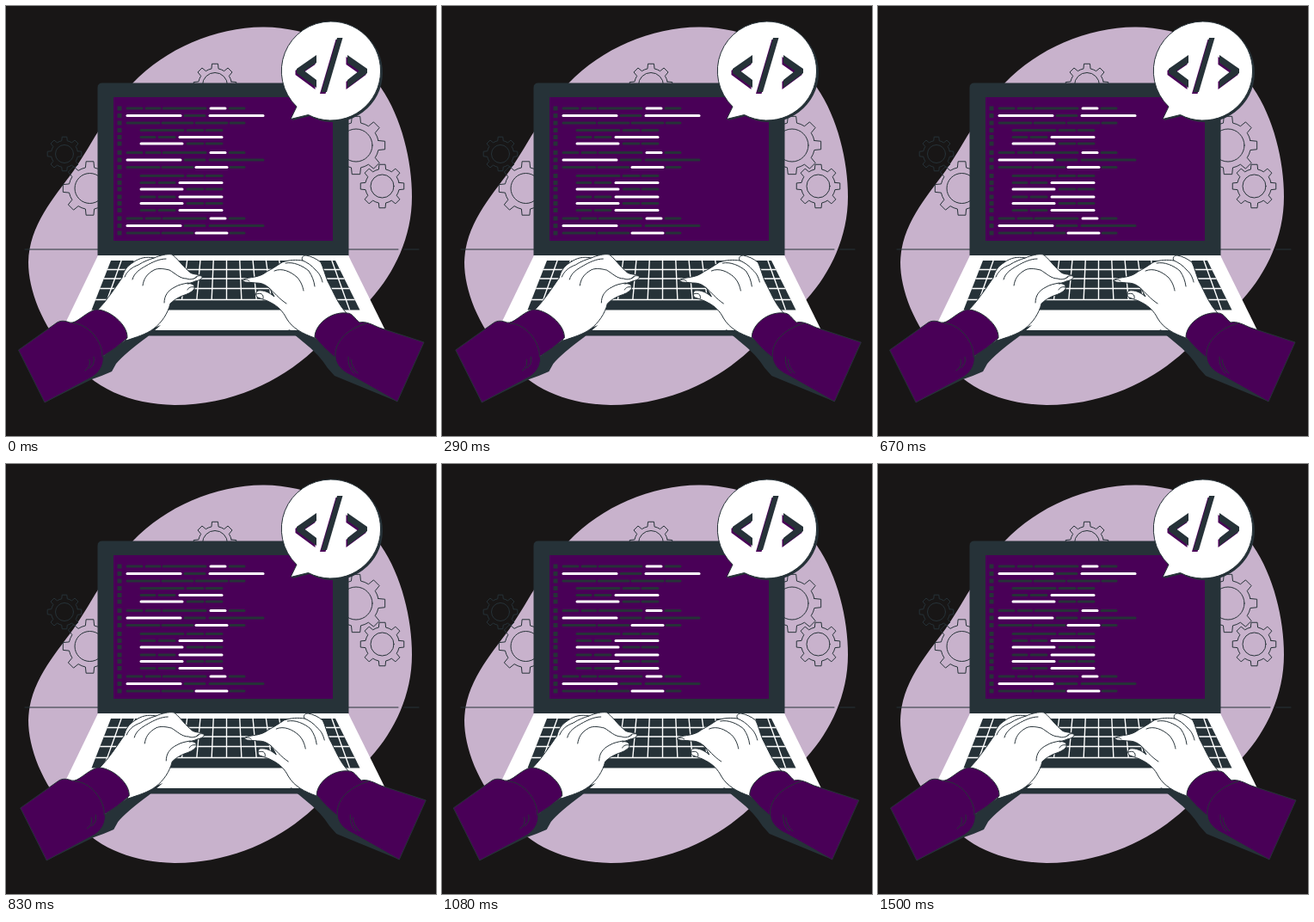
An HTML page that plays this animation: 500x500 px, repeating every 1540 ms.

```html
<!DOCTYPE html>
<html lang="en">
<head>
<meta charset="utf-8">
<title>Typing on a laptop</title>
<style>
  html, body { margin: 0; width: 100%; height: 100%; overflow: hidden; background: #181616; }
  svg { display: block; width: 100vw; height: 100vh; }
  .ink { fill: #263238; }
  .main { fill: #490057; }
  .paper { fill: #fff; }
  .line { fill: none; stroke: #263238; stroke-width: 1; stroke-linecap: round; stroke-linejoin: round; }
  .edge { stroke: #263238; stroke-width: 1; stroke-linejoin: round; }
  #code path { fill: none; stroke-width: 3; stroke-linecap: round; }
</style>
</head>
<body>
<svg viewBox="0 0 500 500">
  <defs>
    <clipPath id="keyArea"><path d="M122 296H383L411.5 353.5H99.5Z"/></clipPath>
    <g id="tag">
      <path d="M361 57V66L347 75.5L361 86V95L338 78V73Z"/>
      <path d="M385 37H391.5L373 100H366.5Z"/>
      <path d="M397 57V66L410.500 75.500L397 86V95L420 78V73Z"/>
    </g>
  </defs>

  <path fill="#c8b2cc" d="M300 24.500C352 25 405 48 436 95C460 130 472 180 472 222C472 268 452 310 424 341C405 362 380 380 357 401C318 437 262 464 196 464C145 463 100 445 72 405C42 372 26 330 26 298C27 255 55 224 79 191C102 158 120 118 148 89C185 50 245 24 300 24.500Z"/>
  <path class="line" d="M22 283H456M463 283H480"/>
  <g id="gears" class="line"></g>

  <path class="ink" d="M112 89.500H393Q398.500 89.500 398.500 95V290H106.500V95Q106.500 89.500 112 89.500Z"/>
  <path class="main" d="M125 106H380V273H125Z"/>
  <g id="code"></g>

  <path class="paper" d="M107 290H398L441 377H65Z"/>
  <path class="ink" d="M64 377H442L439 383.500H67Z"/>
  <g clip-path="url(#keyArea)">
    <path class="ink" d="M95 296H415V354H95Z"/>
    <path id="keys" fill="none" stroke="#fff" stroke-width="1.400"/>
  </g>

  <path class="ink" d="M380 20A57.500 57.500 0 1 1 353 128L333 133L340 118A57.500 57.500 0 0 1 380 20Z"/>
  <path class="paper edge" d="M377.500 18A57.500 57.500 0 1 1 351.500 126.500L331 131.500L338 117A57.500 57.500 0 0 1 377.500 18Z"/>
  <use href="#tag" class="main" x="-1.500" y="2"/>
  <use href="#tag" class="ink"/>

  <g id="arms">
    <g>
      <path class="ink" d="M45 461L100 428L112 408L141 387L180 371L164 385Q138 404 128 416L123 425Q112 430 100 434Z"/>
      <path class="paper edge" d="M106 354C117 343 126 329 135 316C137 308 140 303 148 298C155 293 163 291 172 293C179 290 187 288 193 289C199 293 204 301 212 308C216 313 222 311 228 314C229 317 225 319 220 320C216 322 213 322 211 323C216 322 220 324 219 329C216 333 211 335 205 337C198 340 194 343 191 346C188 358 181 368 172 375C163 382 151 385 140 389Z"/>
      <path class="line" d="M138 315C141 308 146 304 154 301C160 297 166 295 172 293M147 318C149 310 156 306 163 302C170 298 178 294 186 294M159 325C160 318 163 312 172 307C178 304 185 306 190 307C197 311 202 317 210 317C215 319 219 317 222 315M184 345C184 337 188 331 196 327C201 324 206 323 212 322M228 314C224 313 221 314 219 317M219 327C216 326 212 327 211 330"/>
      <path class="main edge" d="M14.500 400L58 369C63 365 69 366 74 368C82 370 91 357 104 353C119 352 142 370 141 386Q127 399 113 407C114 415 111 424 101 431L45 461Z"/>
      <path class="line" d="M78 369C95 369 113 390 112 408M92 424Q99 420 97 411M97 421Q104 417 102 408"/>
    </g>
    <g>
      <path class="ink" d="M455 460L402 426L383 405L358 385L328 376L346 391Q364 405 374 421L382 430Z"/>
      <path class="paper edge" d="M396 357C386 347 381 333 374 320C371 313 369 304 366 298C361 294 355 291 349 290C345 290 343 293 345 296C338 295 329 295 321 298C315 302 309 306 303 309C297 314 290 315 283 316C278 317 274 318 275 320C279 322 285 321 290 322C296 322 300 323 305 327C308 330 310 334 312 338C306 333 300 330 293 331C290 333 290 337 293 339C298 341 303 342 308 345C316 349 322 355 326 363C333 375 345 381 359 386Z"/>
      <path class="line" d="M345 296C350 298 356 302 360 307C365 311 367 317 368 321M325 299C334 297 345 302 352 308C356 314 358 319 359 326M312 308C321 304 331 309 338 315C343 320 345 326 346 331M275 320C278 317 281 318 283 320M291 335C296 333 300 335 299 340M305 327C312 333 317 340 326 346"/>
      <path class="main edge" d="M359 385C359 371 377 355 396 357C403 357 405 363 411 368C418 366 427 371 434 374L486 391L455 460L402 430C393 426 384 419 383 409Q370 399 359 385Z"/>
      <path class="line" d="M383 409C381 391 396 376 419 369M398 408Q397 420 405 427M401 411Q402 421 409 427"/>
    </g>
  </g>
</svg>
<script>
const NS = "http://www.w3.org/2000/svg";
const $ = id => document.getElementById(id);
function add(parent, tag, attrs) {
  const el = document.createElementNS(NS, tag);
  for (const k in attrs) el.setAttribute(k, attrs[k]);
  parent.append(el);
}

// Gears: centre, outer radius, hole radius
function gear(x, y, r, hole) {
  const at = (rad, deg) => {
    const a = deg * Math.PI / 180;
    return (x + rad * Math.cos(a)).toFixed(2) + " " + (y + rad * Math.sin(a)).toFixed(2);
  };
  const root = r * 0.78;
  let d = "";
  for (let a = 0; a < 360; a += 45) {
    d += `${a ? "L" : "M"}${at(root, a - 12)}L${at(r, a - 8)}L${at(r, a + 8)}L${at(root, a + 12)}` +
         `A${root} ${root} 0 0 1 ${at(root, a + 33)}`;
  }
  add($("gears"), "path", { d: d + "Z" });
  add($("gears"), "circle", { cx: x, cy: y, r: hole });
}
gear(243, 92, 25, 14.5);
gear(97.5, 212, 31.5, 17.5);
gear(407, 162, 34, 19);
gear(437.5, 209.5, 25.5, 13.5);
gear(68, 172, 20, 10.5);

// Code lines: [start, end, white?]
const rowTypes = {
  a: [[141, 158], [163, 179], [183, 232], [238, 255, 1], [260, 277]],
  b: [[141, 203, 1], [208, 231], [237, 299, 1]],
  B: [[141, 203, 1], [208, 231], [237, 299]],
  c: [[141, 178], [182, 217], [221, 257], [261, 277]],
  C: [[141, 178], [182, 217], [221, 257, 1], [261, 277]],
  d: [[157, 206], [211, 229], [233, 251]],
  e: [[157, 173], [178, 196], [202, 251, 1]],
  f: [[157, 205, 1], [211, 229], [233, 251]]
};
const rowY = [119, 127.5, 136, 144.5, 152.5, 160, 170.5, 179, 187.5,
              197.5, 205.5, 213, 222, 229.5, 237.5, 247, 255.5, 264];
[..."abcdefaBCdefefeaBC"].forEach((type, i) => {
  const y = rowY[i];
  add($("code"), "rect", { x: 129.5, y: y - 2.5, width: 5, height: 5, class: "ink" });
  for (const [from, to, white] of rowTypes[type])
    add($("code"), "path", { d: `M${from} ${y}H${to}`, stroke: white ? "#fff" : "#263238" });
});

// Keyboard gaps fan out towards the viewer
let gaps = "";
for (const y of [306.5, 317, 328.5, 341.5]) gaps += `M95 ${y}H415`;
for (let j = -9; j <= 9; j++) {
  const x = y => 256.5 + j * (15.3 + (y - 296) * 0.045);
  const end = j > -5 && j < 4 ? 341.5 : 354;
  gaps += `M${x(296)} 296L${x(end)} ${end}`;
}
$("keys").setAttribute("d", gaps);

// Shake: ten equal spans, linear between the stops, stepped at 24 per second
const LOOP = 1540, PERIOD = 1500, LEAD = 30;
const stops = [0, -1, 2, -4, 4, -4, 4, -4, 2, -1, 0];
function shake(ms) {
  const p = (ms + LEAD) % PERIOD / PERIOD * 10;
  const i = Math.floor(p);
  return stops[i] + (stops[i + 1] - stops[i]) * (p - i);
}
const start = performance.now();
function draw(now) {
  const t = Math.max(0, now - start) % LOOP;
  const held = Math.floor((t + 4.9) * 0.024) % 37 / 0.024;
  $("arms").setAttribute("transform", `translate(${(shake(held) - shake(0)).toFixed(3)} 0)`);
  requestAnimationFrame(draw);
}
draw(start);
</script>
</body>
</html>
```
